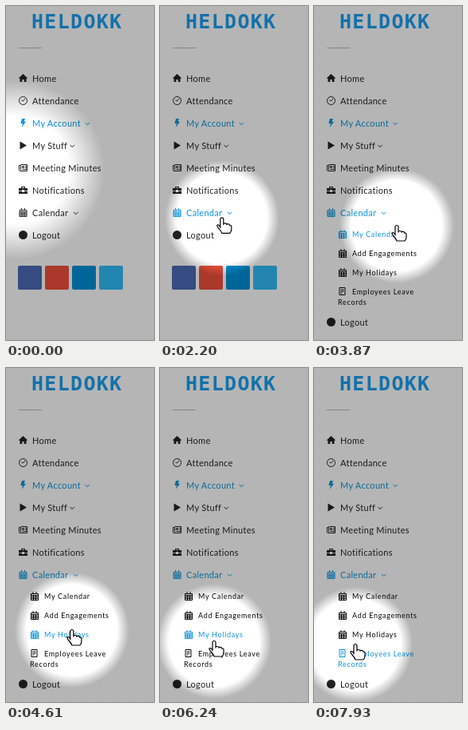
Animation, 186 px wide and 418 px high, one loop 8000 ms. Source, as an HTML page:

```html
<!DOCTYPE html>
<html lang="en">
<head>
<meta charset="utf-8">
<style>
html, body { margin: 0; width: 100%; height: 100%; overflow: hidden; background: #fff; }
svg { display: block; width: 100vw; height: 100vh; }
text { font: 11px Lato, sans-serif; letter-spacing: .3px; fill: currentColor; }
.sub text { font-size: 9px; letter-spacing: .7px; }
.logo { font: bold 25px "DejaVu Sans Mono", monospace; letter-spacing: 1.3px; fill: #1b9ff0; }
.item { color: #222; }
.sub .item { color: #080808; }
.item.on { color: #0b94db; }
.line { fill: none; stroke: currentColor; }
</style>
</head>
<body>
<svg viewBox="0 0 186 418">
  <defs>
    <radialGradient id="spot" gradientUnits="userSpaceOnUse">
      <stop id="inner" stop-opacity="0"/>
      <stop offset="1" stop-opacity=".29"/>
    </radialGradient>
    <clipPath id="fold"><rect id="foldBox" y="272" width="186"/></clipPath>
  </defs>
  <text class="logo" x="32" y="28">HELDOKK</text>
  <path d="M16 52.5h29" stroke="#bbb"/>
  <g id="menu"></g>
  <g clip-path="url(#fold)"><g id="submenu" class="sub"></g></g>
  <g id="lower"></g>
  <rect width="186" height="418" fill="url(#spot)"/>
  <path id="hand" fill="#fff" stroke="#000" stroke-width="1.2" stroke-linejoin="round"
    d="M-2 12V1.5a2 2 0 0 1 4 0V8q0-1.7 2-1.5 2 0 2 1.7 0-1 2-.8 1.8.2 1.8 1.8 2.2-.5 2.2 1.5V14q0 3-2 5H0q-1-3-4-6-2.5-3-2-4 1.5-1.5 4 2z"/>
</svg>
<script>
const $ = id => document.getElementById(id);
const LOOP = 8000;

// Icons are drawn in an 11 px box.
const filled = d => `<path fill="currentColor" fill-rule="evenodd" d="${d}"/>`;
const lined = d => `<path class="line" d="${d}"/>`;
const icons = {
  home: filled('M5.5 0L11 5.2 10 6 9.5 5.6V10H6.7V7H4.3v3H1.5V5.6L1 6 0 5.2z'),
  clock: '<circle class="line" cx="5.5" cy="5.5" r="5"/>' + lined('M8 3L5.3 6 3.5 5'),
  bolt: filled('M4 0h4L6.5 3.7H9L3.7 11 5 6H2.3z'),
  play: filled('M1.5 .5L10 5.5 1.5 10.5z'),
  news: lined('M2.5 1.5h8v8h-9q-1 0-1-1v-6h2v6M4.5 3.5h2v2h-2zM8 3.5h2M8 5.5h2M4.5 7.5h5.5'),
  bag: filled('M0 3h3V1h5v2h3v3H7V5H4v1H0zM4.2 2v1h2.6V2zM0 6.8h4V8h3V6.8h4V10H0z'),
  calendar: lined('M1 2.5h9v8H1zM1 4.5h9M1 6.5h9M1 8.5h9M4 4.5v6M7 4.5v6M3.5 0v3M7.5 0v3'),
  page: lined('M1.5 .5h7v9h-7zM3 3h4M3 5h4M3 7h2'),
  dot: '<circle cx="5.5" cy="5.5" r="5.5" fill="currentColor"/>'
};

const chevron = (x, y) => x ? lined(`M${x} ${y - 5}l2.7 2.5 2.7-2.5`) : '';
const row = (icon, label, y, arrowX, id = '') => `<g class="item" id="${id}">
  <g transform="translate(16 ${y - 10})">${icons[icon]}</g>
  <text x="33" y="${y}">${label}</text>${chevron(arrowX, y)}</g>`;
const subRow = (icon, label, i, more = '') => `<g class="item">
  <g transform="translate(30.5 ${280 + 24 * i})">${icons[icon]}</g>
  <text x="48" y="${289 + 24 * i}">${label}</text>${more}</g>`;

$('menu').innerHTML = [
  ['home', 'Home'], ['clock', 'Attendance'], ['bolt', 'My Account', 99.5, 'account'],
  ['play', 'My Stuff', 80.5], ['news', 'Meeting Minutes'], ['bag', 'Notifications'],
  ['calendar', 'Calendar', 85, 'calendar']
].map(([icon, label, arrowX, id], i) => row(icon, label, 95 + 28 * i, arrowX, id)).join('');
$('account').classList.add('on');

$('submenu').innerHTML =
  ['My Calendar', 'Add Engagements', 'My Holidays'].map((s, i) => subRow('calendar', s, i)).join('') +
  subRow('page', 'Employees Leave', 3, '<text x="30" y="374">Records</text>');

$('lower').innerHTML = row('dot', 'Logout', 291) +
  ['#4a69b5', '#f0503c', '#0090d8', '#30bdf8'].map((color, i) =>
    `<rect x="${15 + 34 * i}" y="325" width="30" height="30" rx="2" fill="${color}"/>`).join('');

// Pointer moves: first step time, x, y, number of steps, last step time.
const start = [12, 205];
const moves = [
  [20, 62, 230, 2, 150], [310, 90, 241], [460, 110, 249], [620, 37, 262, 6, 1260],
  [1550, 82, 266, 4, 1940], [2200, 61, 263, 5, 2720], [2860, 59, 260], [2990, 75, 258, 3, 3250],
  [3870, 104, 275], [4050, 110, 282], [4200, 114, 296], [4330, 88, 326, 2, 4460],
  [4610, 57, 338, 6, 5260], [5400, 60, 339], [5540, 75, 338], [5680, 87, 335],
  [5820, 98, 338, 2, 5950], [6240, 68, 342], [6390, 56, 340], [6530, 50, 339, 2, 6660],
  [7140, 80, 343], [7270, 86, 345], [7620, 81, 345], [7780, 62, 346], [7930, 52, 346]
];

function pointerAt(t) {
  let [x, y] = start;
  for (const [from, toX, toY, steps = 1, to = from] of moves) {
    if (t < from) break;
    const gap = (to - from) / (steps - 1 || 1) || 1;
    const part = Math.min(steps, Math.floor((t - from) / gap + 1.001)) / steps;
    x += (toX - x) * part;
    y += (toY - y) * part;
  }
  return [x, y];
}

const stage = (t, times) => times.filter(s => t >= s).length;

function draw(t) {
  const [x, y] = pointerAt(t);
  const spread = [112, 92, 76, 75, 72][stage(t, [20, 150, 310, 460])];
  const spot = $('spot');
  spot.setAttribute('cx', x);
  spot.setAttribute('cy', y);
  spot.setAttribute('r', spread);
  $('inner').setAttribute('offset', t < 150 ? .6 : .79);
  $('hand').setAttribute('transform', `translate(${x} ${y})`);
  $('hand').style.display = t < 150 ? 'none' : '';

  const open = [0, 51, 109][stage(t, [3250, 3720])];
  $('foldBox').setAttribute('height', open);
  $('lower').setAttribute('transform', `translate(0 ${open})`);

  $('calendar').classList.toggle('on', t >= 620);
  const hovered = stage(t, [3870, 4330, 4460, 7420]) - 1;
  [...$('submenu').children].forEach((el, i) => el.classList.toggle('on', i === hovered));
}

function tick() {
  draw(performance.now() % LOOP);
  requestAnimationFrame(tick);
}
tick();
</script>
</body>
</html>
```
